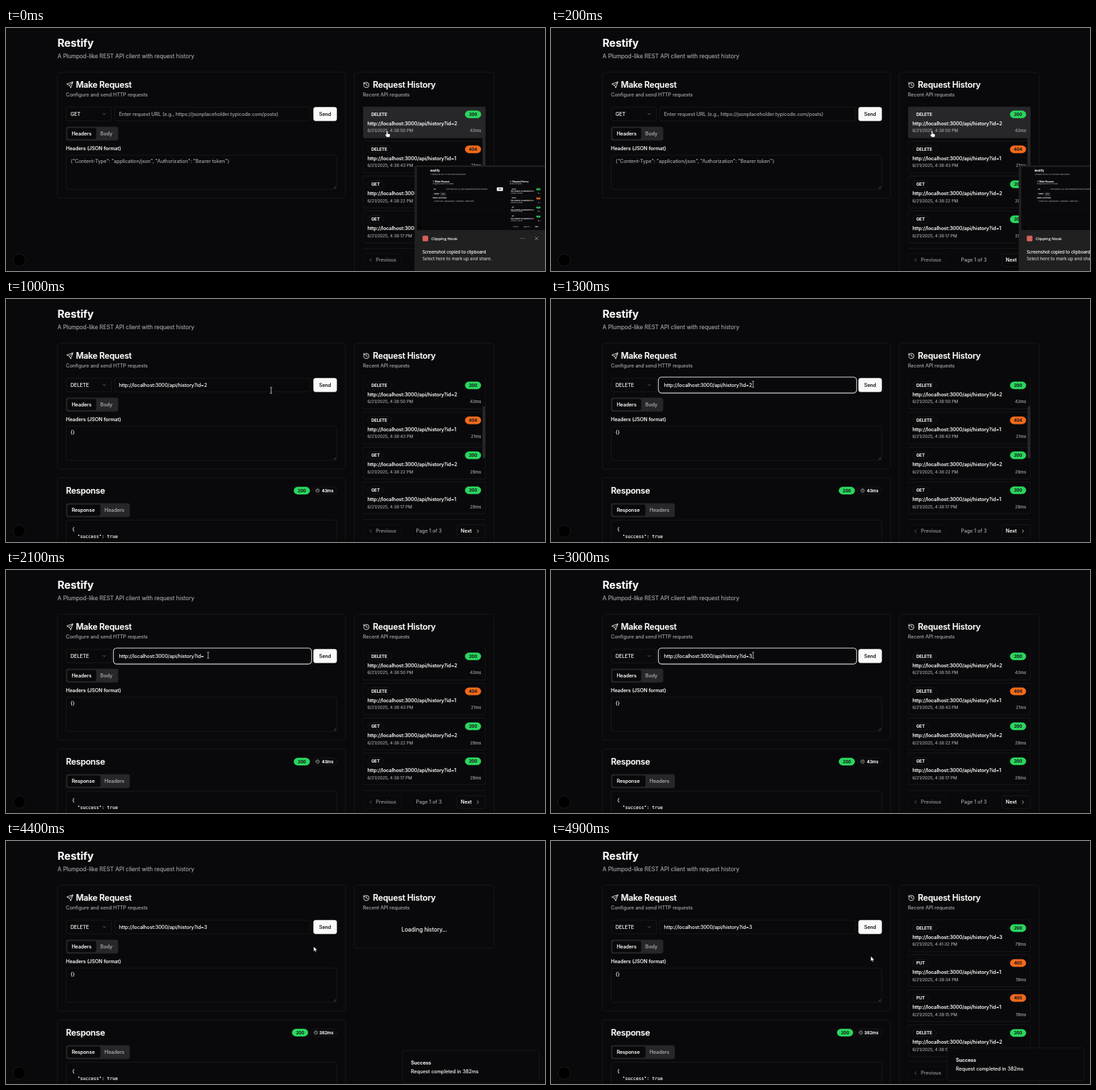
Write an HTML page that moves like this. It is 800x362 px and loops after 5000 ms.

```html
<!DOCTYPE html>
<html lang="en">
<head>
<meta charset="utf-8">
<title>Restify</title>
<style>
  html, body { margin: 0; width: 100%; height: 100%; overflow: hidden; background: #09090b; }
  svg { display: block; width: 100vw; height: 100vh; font-family: Inter, sans-serif; }
  text { white-space: pre; stroke-width: .3px; }
  .mono { font-family: "DejaVu Sans Mono", monospace; }
  .system { font-family: "Open Sans", sans-serif; }
  .tight { letter-spacing: -.018em; }
  .icon { fill: none; stroke-width: 2; stroke-linecap: round; stroke-linejoin: round; }
</style>
</head>
<body>
<svg viewBox="0 0 1536 695.04">
  <defs>
    <clipPath id="list"><rect x="1017" y="225" width="350" height="400"/></clipPath>
    <clipPath id="page"><rect width="1536" height="695"/></clipPath>
  </defs>
  <g id="stage"></g>
</svg>
<script>
const LOOP = 5000, STEP = 100, PX = 1536 / 800;
const BG = '#09090b', LINE = '#27272a', FG = '#fafafa', MUTED = '#a1a1aa', INK = '#18181b';
const GREEN = '#2ad75e', ORANGE = '#f26a1b';

const ICONS = {
  send: 'm22 2-7 20-4-9-9-4ZM22 2 11 13',
  history: 'M3 12a9 9 0 1 0 9-9 9.75 9.75 0 0 0-6.74 2.74L3 8M3 3v5h5M12 7v5l4 2',
  down: 'm6 9 6 6 6-6', left: 'm15 18-6-6 6-6', right: 'm9 18 6-6-6-6',
  clock: 'M2 12a10 10 0 1 0 20 0a10 10 0 1 0-20 0M12 6v6l4 2',
  close: 'M5 5 19 19M19 5 5 19'
};

const CURSORS = {
  arrow: '<path d="M0 0v15l3.5-3.3 2.3 5.3 2.5-1-2.3-5.2h4.8z" fill="#fff" stroke="#000"/>',
  hand: '<path d="M0 0q2 0 2 2v6l5 1.2q2 .6 2 2.5l-1 7H-1L-6 11q1-2 4 0V2q0-2 2-2z" fill="#fff" stroke="#000"/>',
  beam: '<path d="M-3-9q3 0 3 2V7q0 2-3 2M3-9q-3 0-3 2M3 9q-3 0-3-2" fill="none" stroke="#ddd" stroke-width="1.5"/>'
};

// Cursor path: time, x, y in stage pixels
const PATH = [
  [700, 565.5, 153], [1200, 300, 127], [3000, 300, 127], [3500, 473, 130],
  [3950, 473, 130], [4400, 456.5, 157], [4900, 474.5, 171.5]
];

const FIRST_ROWS = [
  ['DELETE', 2, '4:38:50', 200, 43], ['DELETE', 1, '4:38:43', 404, 21],
  ['GET', 2, '4:38:22', 200, 29], ['GET', 1, '4:38:17', 200, 29]
];
const NEW_ROWS = [
  ['DELETE', 3, '4:41:32', 200, 79], ['PUT', 1, '4:39:34', 405, 19],
  ['PUT', 1, '4:39:15', 405, 19], ['DELETE', 2, '4:38:50', 200, 43]
];

const clamp = v => Math.max(0, Math.min(1, v));
const smooth = p => p * p * (3 - 2 * p);

// y is the middle of the text line
const text = (x, y, s, size = 14, fill = FG, weight = 400, more = '') =>
  `<text x="${x}" y="${y + size * .364}" font-size="${size}" fill="${fill}" stroke="${fill}" font-weight="${weight}" ${more}>${s}</text>`;
const MIDDLE = 'text-anchor="middle"', END = 'text-anchor="end"', TIGHT = 'class="tight"';

const box = (x, y, w, h, r = 6, fill = 'none', stroke = LINE) =>
  `<rect x="${x + .5}" y="${y + .5}" width="${w - 1}" height="${h - 1}" rx="${r}" fill="${fill}" stroke="${stroke}"/>`;
const fillBox = (x, y, w, h, r, fill) => box(x, y, w, h, r, fill, fill);

const icon = (name, x, y, size, color = FG) =>
  `<path class="icon" d="${ICONS[name]}" stroke="${color}" transform="translate(${x} ${y}) scale(${size / 24})"/>`;
const group = (x, y, body) => `<g transform="translate(${x} ${y})">${body}</g>`;

const badge = (x, y, code) =>
  fillBox(x, y, 46, 22, 11, code < 300 ? GREEN : ORANGE) +
  text(x + 23, y + 11, code, 12, INK, 600, MIDDLE);

const tabs = (y, active, activeW, other, w) =>
  fillBox(171, y, w, 40, 6, LINE) + fillBox(175, y + 4, activeW, 32, 4, BG) +
  text(187, y + 20, active, 14, FG, 500) + text(187 + activeW, y + 20, other, 14, MUTED, 500);

function requestCard(s) {
  const left = s.sending ? 842 : 876, inputW = left - 8 - 309;
  return box(146, 126, 822, 361, 8) +
    icon('send', 172, 153, 20) + text(199, 163, 'Make Request', 24, FG, 600, TIGHT) +
    text(171, 191, 'Configure and send HTTP requests', 14, MUTED) +
    box(171, 226, 130, 40) + text(184, 246, s.url ? 'DELETE' : 'GET') + icon('down', 272, 238, 16, '#85858a') +
    box(309, 226, inputW, 40) +
    (s.url ? text(322, 246, s.url)
           : text(322, 246, 'Enter request URL (e.g., https://jsonplaceholder.typicode.com/posts)', 14, MUTED)) +
    (s.focus ? `<rect x="306" y="223" width="565" height="46" rx="9" fill="none" stroke="#d4d4d8" stroke-width="2"/>` : '') +
    fillBox(left, 226, 943 - left, 40, 6, s.sending ? '#818182' : FG) +
    text((left + 943) / 2, 246, s.sending ? 'Sending...' : 'Send', 14, s.sending ? '#111113' : INK, 500, MIDDLE) +
    tabs(282, 'Headers', 82, 'Body', 149) +
    text(171, 343.5, 'Headers (JSON format)', 14, FG, 500) +
    box(171, 363, 772, 99) +
    text(184, 381.5, s.url ? '{}' : '{"Content-Type": "application/json", "Authorization": "Bearer token"}', 14, s.url ? FG : MUTED) +
    `<path d="M934 459l6-6M938 459l2-2" stroke="${MUTED}"/>`;
}

function responseCard(ms) {
  const pillX = ms > 99 ? 868 : 873;
  return box(146, 511, 822, 240, 8) +
    text(171, 548, 'Response', 24, FG, 600, TIGHT) +
    badge(pillX - 53, 537, 200) +
    box(pillX, 537, 943 - pillX, 22, 11) + icon('clock', pillX + 9, 542, 12) +
    text(933, 548, ms + 'ms', 12, FG, 600, END) +
    tabs(584, 'Response', 94, 'Headers', 182) +
    box(171, 632, 772, 110) +
    text(188, 658.5, '{', 12.8, FG, 400, 'class="mono"') +
    text(188, 679, '  "success": true', 12.8, FG, 400, 'class="mono"');
}

const row = ([method, id, time, code, ms], y, hover) =>
  box(1017, y, 350, 92, 6, hover ? LINE : 'none') +
  box(1030, y + 13, method === 'DELETE' ? 69 : 46, 22, 11, 'none', hover ? '#303034' : LINE) +
  text(1041, y + 24, method, 12, FG, 600) + badge(1308, y + 13, code) +
  text(1030, y + 50, 'http://localhost:3000/api/history?id=' + id, 14, FG, 500) +
  text(1030, y + 71, `6/21/2025, ${time} PM`, 12, MUTED) + text(1354, y + 71, ms + 'ms', 12, MUTED, 400, END);

function historyCard(s) {
  const head = box(992, 126, 400, s.rows ? 600 : 181, 8) +
    icon('history', 1017, 153, 20) + text(1045.5, 163, 'Request History', 24, FG, 600, TIGHT) +
    text(1017, 191, 'Recent API requests', 14, MUTED);
  if (!s.rows) return head + text(1192, 253, 'Loading history...', 16, FG, 400, MIDDLE);
  const top = s.rows === FIRST_ROWS ? 223 : 225;
  return head +
    `<g clip-path="url(#list)">${s.rows.map((r, i) => row(r, top + 100 * i, s.hover && !i)).join('')}</g>` +
    `<rect x="1358" y="306" width="8" height="150" rx="4" fill="${LINE}" opacity="${s.bar}"/>` +
    `<path d="M1017 630.5h350" stroke="${LINE}"/>` +
    box(1017, 645, 110, 38, 6, 'none', '#1a1a1d') + icon('left', 1031, 656, 16, '#85858a') +
    text(1054, 664, 'Previous', 14, '#85858a', 500) +
    text(1205, 664, 'Page 1 of 3', 14, MUTED, 400, MIDDLE) +
    box(1285, 645, 82, 38) + text(1296, 664, 'Next', 14, FG, 500) + icon('right', 1337, 656, 16);
}

const app = s =>
  `<rect width="1536" height="696" fill="${BG}"/>` +
  text(147, 43, 'Restify', 30, FG, 700) +
  text(147, 81, 'A Plumpod-like REST API client with request history', 16, MUTED) +
  requestCard(s) + (s.ms ? responseCard(s.ms) : '') + historyCard(s) +
  '<circle cx="38" cy="664" r="17.5" fill="#000" stroke="#303030"/>';

const BLANK = { url: '', rows: FIRST_ROWS, bar: 0 };

const captureToast = dx => group(dx, 0,
  fillBox(1164, 393, 400, 330, 6, '#202020') +
  `<g transform="translate(1171 397) scale(.26)" clip-path="url(#page)">${app(BLANK)}</g>` +
  fillBox(1187, 594, 16, 16, 2, '#d8605c') +
  text(1212, 602, 'Clipping Nook', 11.5, '#eee', 400, 'class="system"') +
  text(1187, 640, 'Screenshot copied to clipboard', 12.6, '#fff', 400, 'class="system"') +
  text(1187, 660, 'Select here to mark up and share.', 12.6, '#c8c8c8', 400, 'class="system"') +
  [1467, 1472, 1477].map(x => `<circle cx="${x}" cy="602" r="1" fill="#ccc"/>`).join('') +
  icon('close', 1505, 595, 14, '#ccc'));

const doneToast = dy => group(0, dy,
  box(1129, 591, 391, 95, 6, BG) +
  text(1154, 627, 'Success', 14, FG, 600) + text(1154, 651, 'Request completed in 382ms'));

function cursorAt(t) {
  let i = PATH.findIndex(p => p[0] > t);
  if (i < 0) i = PATH.length;
  const a = PATH[Math.max(0, i - 1)], b = PATH[Math.min(i, PATH.length - 1)];
  const p = b[0] > a[0] ? smooth(clamp((t - a[0]) / (b[0] - a[0]))) : 0;
  return [a[1] + (b[1] - a[1]) * p, a[2] + (b[2] - a[2]) * p];
}

function scene(t) {
  const [x, y] = cursorAt(t);
  const digit = t < 2000 ? 2 : t < 2300 ? '' : 3;
  const sending = t >= 3600 && t < 4300;
  const hover = t < 1200 && x > 530;
  const state = {
    url: t < 700 ? '' : 'http://localhost:3000/api/history?id=' + digit,
    ms: t < 700 ? 0 : t < 3600 ? 43 : t < 4000 ? 0 : 382,
    focus: t >= 1300 && t < 3600,
    rows: t < 4300 ? FIRST_ROWS : t < 4600 ? null : NEW_ROWS,
    bar: clamp((1500 - t) / 200),
    sending, hover
  };
  const overSend = t < 3600 && x > 456 && x < 491 && y < 138;
  const shape = hover || overSend ? 'hand' : t < 3600 && x < 452 ? 'beam' : 'arrow';
  return app(state) +
    group(x * PX, y * PX, CURSORS[shape]) +
    (t < 300 ? captureToast(380 * (t / 300) ** 2) : '') +
    (t >= 4300 ? doneToast(104 * clamp((4500 - t) / 200) ** 3.7) : '');
}

const stage = document.getElementById('stage');
const start = performance.now();
let shown = -1;

function tick() {
  const t = Math.floor((performance.now() - start) % LOOP / STEP) * STEP;
  if (t !== shown) stage.innerHTML = scene(shown = t);
  requestAnimationFrame(tick);
}
tick();
</script>
</body>
</html>
```
